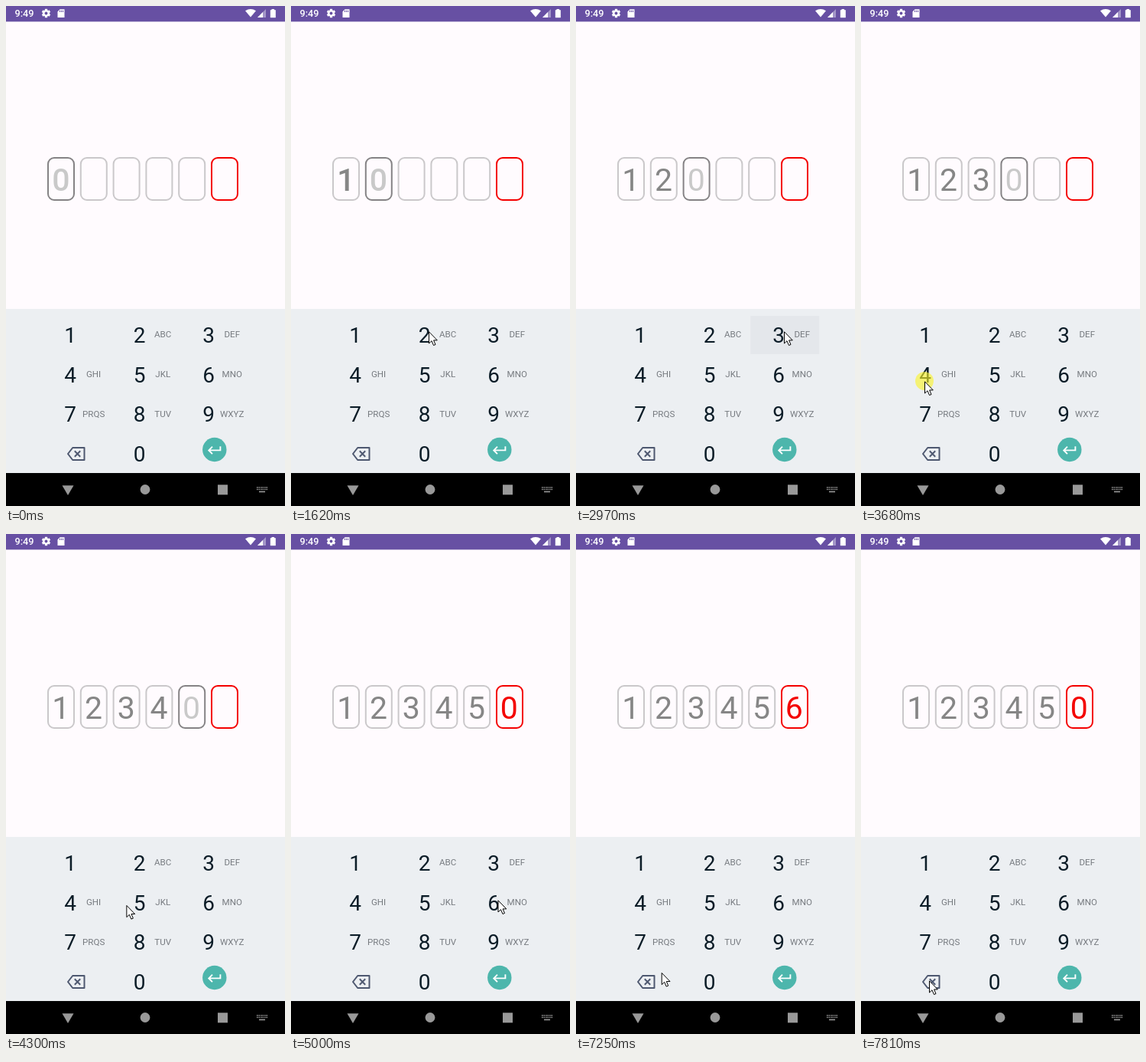
Animation, 365 px wide and 652 px high, one loop 8000 ms. Source, as an HTML page with a canvas:

```html
<!DOCTYPE html>
<html lang="en">
<head>
<meta charset="utf-8">
<title>Code entry</title>
<style>
  html, body { margin: 0; width: 100%; height: 100%; overflow: hidden; background: #fffbfe; }
  canvas { display: block; width: 365px; height: 652px; }
</style>
</head>
<body>
<canvas id="stage"></canvas>
<script>
const W = 365, H = 652, LOOP = 8000, STEP = 70;
const canvas = document.getElementById('stage');
const dpr = window.devicePixelRatio || 1;
canvas.width = W * dpr;
canvas.height = H * dpr;
const c = canvas.getContext('2d');

// Pointer moves: start, end, x, y
const entry = [207, 567];
const moves = [
  [320, 600, 84, 424], [1270, 1620, 180, 424], [2080, 2430, 272, 424],
  [2990, 3550, 83, 489], [3930, 4440, 180, 482], [4650, 5000, 270.5, 477],
  [5750, 6220, 231, 479], [6420, 6700, 289, 490], [6700, 7320, 89, 582]
];

// Keys 1 to 6, then backspace; the field reacts a little later
const presses = [1000, 1880, 2760, 3680, 4570, 5340, 7590];
const LAG = 220;

const letters = ['', ...'ABC DEF GHI JKL MNO PRQS TUV WXYZ'.split(' ')];
const keyX = i => 84 + 90.6 * (i % 3);
const rowY = i => 51.6 * Math.floor(i / 3);

function rect(x, y, w, h, color) {
  c.fillStyle = color;
  c.fillRect(x, y, w, h);
}

function disc(x, y, r, color) {
  c.fillStyle = color;
  c.beginPath();
  c.arc(x, y, r, 0, Math.PI * 2);
  c.fill();
}

function poly(points, color) {
  c.beginPath();
  points.forEach(([x, y]) => c.lineTo(x, y));
  c.closePath();
  if (color) {
    c.fillStyle = color;
    c.fill();
  }
}

function text(s, x, y, size, color, weight = 400, align = 'center') {
  c.font = `${weight} ${size}px Roboto, sans-serif`;
  c.textAlign = align;
  c.fillStyle = color;
  c.fillText(s, x, y);
}

function statusBar() {
  rect(0, 0, W, 20.4, '#6750a3');
  text('9:49', 11.5, 14.2, 12.7, '#fff', 500, 'left');

  // Gear
  for (let i = 0; i < 3; i++) {
    c.save();
    c.translate(52.5, 9.5);
    c.rotate(i * Math.PI / 3);
    rect(-1.6, -5.7, 3.2, 11.4, '#fff');
    c.restore();
  }
  disc(52.5, 9.5, 4.4, '#fff');
  disc(52.5, 9.5, 1.9, '#6750a3');

  // Memory card
  poly([[67.5, 7.5], [70.5, 4.3], [76.5, 4.3], [76.5, 15], [67.5, 15]], '#fff');
  for (let i = 0; i < 3; i++) rect(70 + i * 2, 5.7, 1, 2.3, '#6750a3');

  // Wi-Fi, signal, battery
  c.fillStyle = '#fff';
  c.beginPath();
  c.moveTo(320, 14.6);
  c.lineTo(313, 6.2);
  c.quadraticCurveTo(320, 1.9, 327, 6.2);
  c.fill();
  poly([[340, 4], [340, 15], [329, 15]], 'rgba(255,255,255,.4)');
  poly([[336, 8], [336, 15], [329, 15]], '#fff');
  rect(347.5, 4, 3.5, 2, '#fff');
  rect(345.8, 5.2, 7, 10, '#fff');
}

function field(count) {
  for (let i = 0; i < 6; i++) {
    const last = i === 5;
    c.strokeStyle = last ? '#f40000' : i === count ? '#858385' : '#cac8ca';
    c.lineWidth = 2;
    c.beginPath();
    c.roundRect(55 + 42.8 * i, 198, 34, 55, 8);
    c.stroke();
    if (i > count) continue;
    const filled = i < count;
    const color = last ? '#f40000' : filled ? '#868686' : '#c9c9c9';
    text(filled ? i + 1 : 0, 71.8 + 42.7 * i, 241.3, 41, color, count < 2 ? 500 : 400);
  }
}

function backspace() {
  c.strokeStyle = '#4e5870';
  c.lineWidth = 2;
  c.lineJoin = 'round';
  poly([[81, 584], [87.2, 576], [102.5, 576], [102.5, 592], [87.2, 592]]);
  c.stroke();
  c.beginPath();
  for (const d of [-1, 1]) {
    c.moveTo(89.8, 584 - 3.7 * d);
    c.lineTo(97.2, 584 + 3.7 * d);
  }
  c.stroke();
}

function enterKey() {
  disc(272.8, 578.5, 15.7, '#4db6ac');
  c.strokeStyle = '#fff';
  c.lineWidth = 1.9;
  c.lineJoin = 'miter';
  c.beginPath();
  c.moveTo(280.4, 574.2);
  c.lineTo(280.4, 579.4);
  c.lineTo(265.5, 579.4);
  c.moveTo(270, 574.7);
  c.lineTo(265.3, 579.4);
  c.lineTo(270, 584.1);
  c.stroke();
}

function keyboard(t) {
  rect(0, 395, W, 214, '#eceff2');
  presses.forEach((at, i) => {
    const key = i < 6 ? i : 9;
    if (t >= at + STEP && t < at + LAG) {
      rect(keyX(key) - 37, 404 + rowY(key), 90, 50, '#e4e7eb');
    }
  });
  letters.forEach((s, i) => {
    text(i + 1, keyX(i), 439 + rowY(i), 28, '#0b1c27');
    text(s, keyX(i) + 30.6, 432.4 + rowY(i), 11.6, '#777b80');
  });
  text(0, keyX(10), 439 + rowY(10), 28, '#0b1c27');
  backspace();
  enterKey();
}

function navBar() {
  const gray = '#999';
  rect(0, 609, W, 43, '#000');
  poly([[73.5, 625.3], [88.5, 625.3], [81, 638]], gray);
  disc(182, 630.5, 6.4, gray);
  rect(277, 624.3, 13, 13, gray);
  for (let i = 0; i < 12; i++) {
    rect(328 + 2.5 * (i % 6), 627 + 2.6 * Math.floor(i / 6), 1.5, 1.5, gray);
  }
  rect(331, 632.6, 8, 1.6, gray);
}

// Eased position, refreshed once per step
function pointerAt(t) {
  let [x, y] = entry;
  for (const [start, end, tx, ty] of moves) {
    if (t < start) break;
    const held = Math.floor((t - start) / STEP) * STEP;
    const k = t >= end ? 1 : held / (end - start);
    const e = k * k * (3 - 2 * k);
    x += (tx - x) * e;
    y += (ty - y) * e;
  }
  return [x, y];
}

function pointer(t) {
  if (t < moves[0][0]) return;
  const [x, y] = pointerAt(t);
  if (presses.some(at => t >= at && t < at + STEP)) {
    disc(x, y, 12, 'rgba(250,243,40,.62)');
  }
  c.save();
  c.translate(x, y);
  c.strokeStyle = '#000';
  c.lineWidth = 1;
  c.lineJoin = 'miter';
  poly([[0.5, 0.8], [0.5, 16], [4, 12.7], [6.5, 18.5], [9, 17.5], [6.6, 11.9], [11.3, 11.9]], '#fff');
  c.stroke();
  c.restore();
}

function draw(t) {
  const done = presses.filter(at => t >= at + LAG).length;
  c.setTransform(dpr, 0, 0, dpr, 0, 0);
  rect(0, 0, W, H, '#fffbfe');
  statusBar();
  field(done > 6 ? 5 : done);
  keyboard(t);
  navBar();
  pointer(t);
}

const begin = performance.now();
function tick() {
  draw((performance.now() - begin) % LOOP);
  requestAnimationFrame(tick);
}
tick();
</script>
</body>
</html>
```
